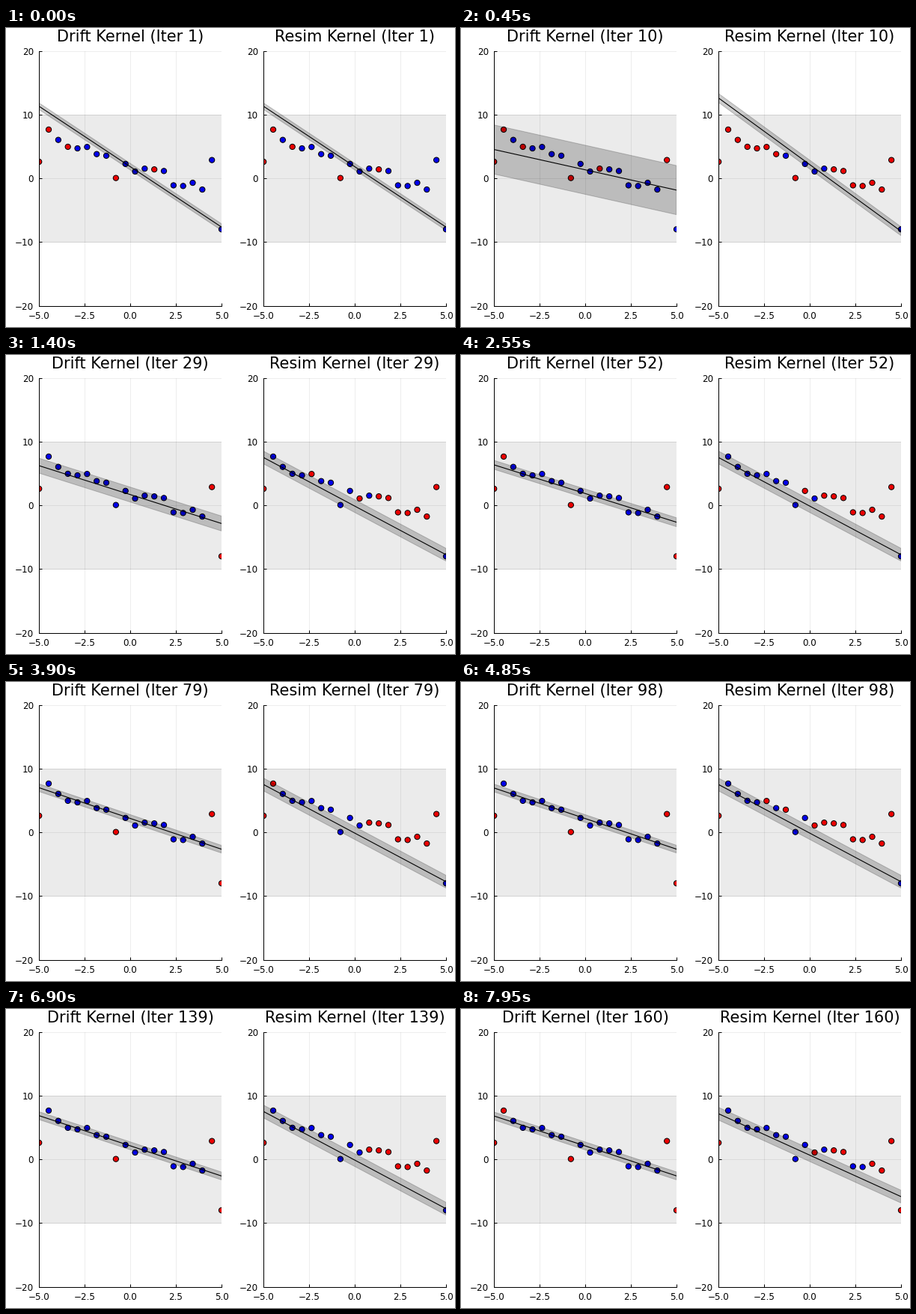
These frames come from a looping animation (600x400 px, 8 s). A matplotlib script:

```python
import matplotlib.pyplot as plt
import numpy as np
from matplotlib.animation import FuncAnimation

FRAMES, STEP_MS = 160, 50
W, H, DPI = 600, 400, 100
PT = 72 / DPI  # points per pixel

plt.rcParams["font.family"] = "DejaVu Sans"

# Observations
X = np.linspace(-5, 5, 20)
Y = np.array([2.6, 7.65, 6.03, 4.95, 4.7, 4.92, 3.8, 3.55, 0.05, 2.26,
              1.07, 1.52, 1.4, 1.15, -1.1, -1.2, -0.7, -1.76, 2.87, -8.0])
START_OUTLIERS = [0, 1, 3, 8, 12]

# Chain states by frame: line at x=-5, line at x=5, noise
START = (11.3, -7.65, 0.52)
DRIFT = {0: START, 9: (4.52, -1.85, 3.85), 28: (6.22, -2.85, 1.17),
         51: (6.35, -2.65, 0.7), 78: (7.0, -2.65, 0.6), 159: (6.8, -2.6, 0.62)}
RESIM = {0: START, 5: (12.6, -8.3, 0.7), 21: (7.5, -7.75, 1.0), 156: (7.15, -5.85, 1.0)}


def drifting(keys):
    """Small accepted moves: each state is held for three frames."""
    times, states = list(keys), np.array(list(keys.values()))
    out = np.zeros((FRAMES, 3))
    for f in range(FRAMES):
        held = max(f - f % 3, max(t for t in times if t <= f))
        out[f] = [np.interp(held, times, column) for column in states.T]
    return out


def jumping(keys):
    """Hold each state until the next accepted proposal."""
    return np.array([keys[max(t for t in keys if t <= f)] for f in range(FRAMES)])


def sample_outliers(states, seed):
    """Resample some flags per frame, by how badly each point fits the line."""
    rng = np.random.default_rng(seed)
    flags = np.zeros((FRAMES, len(X)), bool)
    flags[0, START_OUTLIERS] = True
    for f in range(1, FRAMES):
        left, right, noise = states[f]
        z = (Y - left - (right - left) * (X + 5) / 10) / noise
        inlier = np.exp(-z * z / 2) / (noise * np.sqrt(2 * np.pi))
        outlier = 1 / 20  # uniform over the grey band
        p = outlier ** 2 / (outlier ** 2 + inlier ** 2)
        fresh = rng.random(len(X)) < p
        flags[f] = np.where(rng.random(len(X)) < 0.4, fresh, flags[f - 1])
    return flags


class Panel:
    def __init__(self, fig, left, name, states, seed):
        self.name, self.states = name, states
        self.flags = sample_outliers(states, seed)
        ax = fig.add_axes([left / W, 1 - 371.6 / H, 243.8 / W, 341 / H])
        ax.set(xlim=(-5, 5), ylim=(-20, 20),
               xticks=np.arange(-5, 5.1, 2.5), yticks=range(-20, 21, 10))
        ax.set_axisbelow(True)
        ax.grid(color="black", alpha=0.1, lw=0.5)
        ax.tick_params(direction="in", length=3.2, width=PT, labelsize=8.57, pad=5.3)
        ax.spines[["top", "right"]].set_visible(False)
        ax.spines[["left", "bottom"]].set_linewidth(PT)

        self.dots = ax.scatter(X, Y, s=5.2 ** 2, edgecolors="black",
                               linewidths=PT, zorder=2)
        self.band(ax, 0.08).set_xy([(-5, -10), (5, -10), (5, 10), (-5, 10)])
        self.ribbon = self.band(ax, 0.2)
        self.line, = ax.plot([-5, 5], [0, 0], color="black", lw=0.8, zorder=4)
        self.title = fig.text((left + 121.9) / W, 1 - 18 / H, "", fontsize=15,
                              ha="center", va="baseline")

    @staticmethod
    def band(ax, alpha):
        return ax.fill([-5, 5, 5], [0, 0, 0], fc=(0, 0, 0, alpha),
                       ec=(0, 0, 0, alpha), lw=PT, zorder=3)[0]

    def show(self, f):
        a, b, s = self.states[f]
        self.line.set_ydata([a, b])
        self.ribbon.set_xy([(-5, a - s), (5, b - s), (5, b + s), (-5, a + s)])
        self.dots.set_facecolor(["red" if out else "blue" for out in self.flags[f]])
        self.title.set_text(f"{self.name} Kernel (Iter {f + 1})")


fig = plt.figure(figsize=(W / DPI, H / DPI), dpi=DPI, facecolor="white")
panels = [Panel(fig, 44.2, "Drift", drifting(DRIFT), 1),
          Panel(fig, 344.2, "Resim", jumping(RESIM), 2)]


def update(f):
    for panel in panels:
        panel.show(f)
    return []


anim = FuncAnimation(fig, update, frames=FRAMES, interval=STEP_MS,
                     init_func=lambda: update(0), repeat=True, repeat_delay=0)
plt.show()
```
